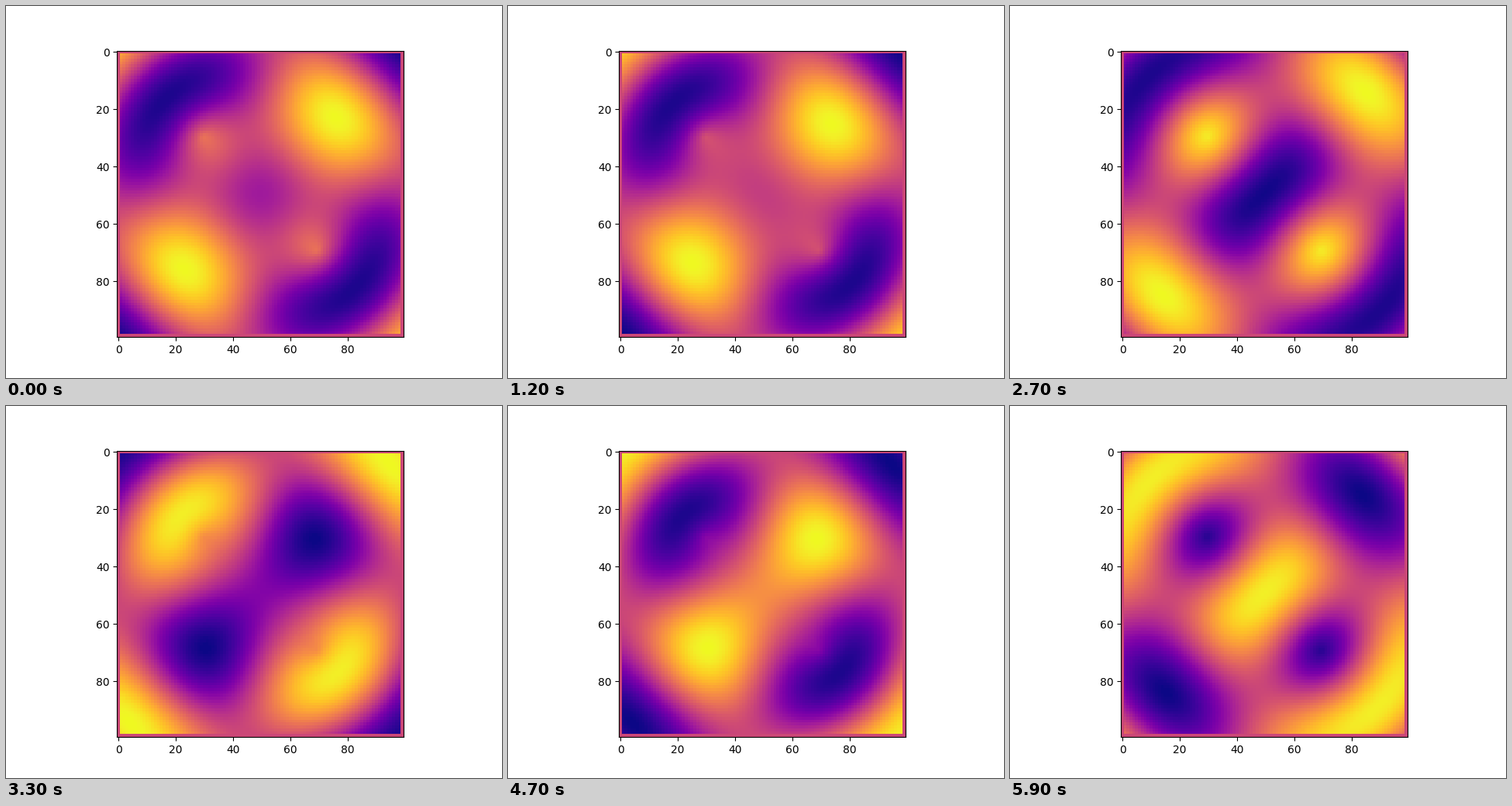
Recreate the animation shown at these times as a matplotlib script. Size 640 px wide and 480 px high, loop 6000 ms.

```python
import numpy as np
import matplotlib.pyplot as plt
from matplotlib.animation import FuncAnimation

N = 100
FRAMES = 60
DT = 0.05
SOURCES = [(3, 3), (7, 7)]

axis = np.linspace(0, 10, N)
X, Y = np.meshgrid(axis, axis)
DISTANCES = [np.hypot(X - sx, Y - sy) for sx, sy in SOURCES]


def field(i):
    """Two circular waves whose frequency rises with time; edges stay at zero."""
    t = i * DT
    phase = 2 * np.pi * (1 + t) * t
    waves = sum(np.sin(phase - r) for r in DISTANCES)
    u = np.zeros((N, N))
    u[1:-1, 1:-1] = waves[1:-1, 1:-1]
    return u


fig, ax = plt.subplots(figsize=(6.4, 4.8), dpi=100)
image = ax.imshow(field(0), cmap="plasma", vmin=-2, vmax=2)


def update(i):
    image.set_data(field(i))
    return [image]


anim = FuncAnimation(fig, update, frames=FRAMES, interval=100, repeat=True)
plt.show()
```
